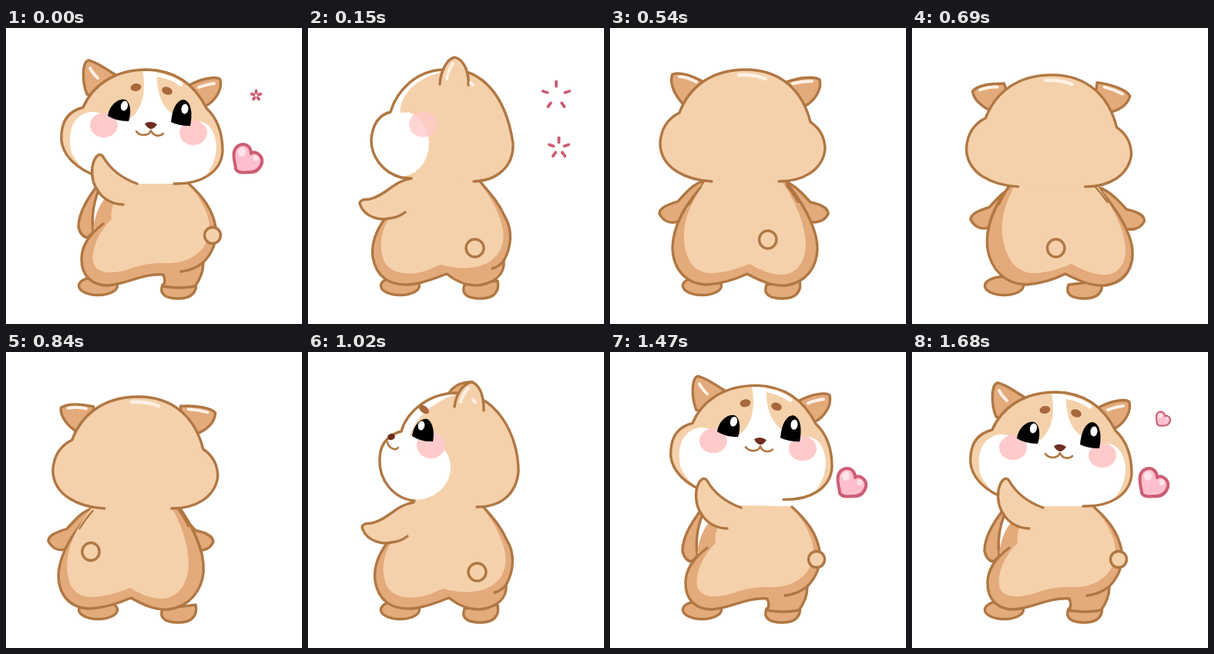
Write an HTML page with a canvas that moves like this. It is 384x384 px and loops after 1.71 s.

```html
<!DOCTYPE html>
<html lang="en">
<head>
<meta charset="utf-8">
<title>Dancing hamster</title>
<style>
html, body { margin: 0; width: 100%; height: 100%; overflow: hidden; background: #fff; }
canvas { display: block; width: 100vw; height: 100vh; }
</style>
</head>
<body>
<canvas id="stage" width="384" height="384"></canvas>
<script>
const c = document.getElementById('stage').getContext('2d');
const LOOP = 1710, STEP = 30;
const TAN = '#f5d1ab', SHADE = '#e3aa7b', LINE = '#b07743', BLUSH = '#ffcaca',
  BROW = '#a9683c', NOSE = '#6e2c20', GLOSS = '#fff0e4', ROSE = '#cc5d75';
c.lineCap = c.lineJoin = 'round';

const clamp = x => Math.max(0, Math.min(1, x));
const ramp = (t, a, b) => clamp((t - a) / (b - a));
const ease = x => x * x * (3 - 2 * x);
const mix = (a, b, k) => a + (b - a) * k;
const rad = deg => deg * Math.PI / 180;

function shape(d, fill, stroke, width = 3.4) {
  const p = typeof d === 'string' ? new Path2D(d) : d;
  if (fill) { c.fillStyle = fill; c.fill(p); }
  if (stroke) { c.strokeStyle = stroke; c.lineWidth = width; c.stroke(p); }
}
function oval(x, y, rx, ry, fill, stroke, deg = 0) {
  const p = new Path2D();
  p.ellipse(x, y, rx, ry, rad(deg), 0, 7);
  shape(p, fill, stroke);
}
function at(x, y, draw) {
  c.save();
  c.translate(x, y);
  draw();
  c.restore();
}
// Draw turned about a pivot point
function turned(x, y, deg, draw) {
  c.save();
  c.translate(x, y);
  c.rotate(rad(deg));
  c.translate(-x, -y);
  draw();
  c.restore();
}
function clipped(d, draw) {
  c.save();
  c.clip(new Path2D(d));
  draw();
  c.restore();
}

function feet() {
  oval(119.5, 334.5, 25, 12, SHADE, LINE);
  shape('M203 333C198 346 208 351 224 351C241 351 249 342 246 328Z', SHADE, LINE);
}

// Front view
function frontBody() {
  shape('M130 191C104 220 94 242 94 258Q97 271 106 272L114 264', SHADE, LINE);
  feet();
  shape('M133 188C116 212 109 238 113 264L180 264L190 196Z', '#fff');
  shape('M133 188C117 210 110 236 113 263', null, LINE);
  const torso = 'C108 268 98 282 98 300C98 322 112 334 132 334C156 333 176 318 204 320' +
    'C207 327 206 332 203 335Q225 339 245 335C252 326 256 315 256 304C268 292 274 278 272 258C268 235 255 218 236 201';
  shape('M160 200C133 206 116 232 113 262L126 254' + torso + 'Z', SHADE);
  shape('M168 199C144 204 135 232 137 248C122 262 111 284 113 303C116 320 140 320 162 312' +
    'C178 306 190 305 204 305C237 307 262 290 264 262C265 240 250 217 235 200Z', TAN);
  shape('M126 254' + torso, null, LINE);
  shape('M227 316Q244 314 256 304', null, LINE);
}
function frontHead(x, y, deg, droop) {
  const outline = 'M218 202C252 203 279 188 281 160C281 138 275 118 260 104C246 76 222 55 183 54' +
    'C140 54 112 75 100 103C84 107 73 118 72 138C70 155 80 176 112 190';
  const fill = outline + 'Q140 201 168 202Z';
  at(x, y, () => turned(180, 130, deg, () => {
    turned(124, 75, -droop, () => {
      shape('M105 86C98 68 99 44 107 42C118 44 132 55 144 62L120 90Z', SHADE, LINE);
      shape('M109 52Q112 58 119 65', null, GLOSS, 4);
    });
    turned(250, 88, droop, () => {
      shape('M238 74C255 65 274 62 278 67C281 80 271 96 257 102Z', SHADE, LINE);
      shape('M250 77Q261 73 270 72', null, GLOSS, 4);
    });
    shape(fill, TAN);
    clipped(fill, () => {
      shape('M176 50C182 75 180 105 160 118C140 125 125 106 108 109C86 114 80 135 84 158' +
        'C90 178 115 198 150 206L240 206C262 195 273 175 273 152C271 132 262 122 250 121' +
        'C235 126 208 112 201 92C196 78 195 66 196 50Z', '#fff');
      shape('M198 61Q216 64 227 73', null, '#fff', 5);
    });
    shape(outline, null, LINE);
  }));
}
function openFace() {
  oval(127, 126, 18, 16, BLUSH);
  oval(243, 136, 18, 16, BLUSH);
  oval(168.5, 77, 7, 5, BROW, null, -10);
  oval(209, 81.5, 7, 5, BROW, null, 18);
  shape('M132 114C134 99 147 90 155 93C163 98 162 112 159 121Q143 121 132 114Z', '#000');
  shape('M214 122C216 103 222 93 231 93C241 96 242 112 239 127Q224 127 214 122Z', '#000');
  oval(153.5, 101, 4.5, 6.5, '#fff', null, 15);
  oval(232, 105, 4.5, 6.5, '#fff', null, 5);
  shape('M169 134C173 140 185 141 188 133C191 141 200 141 204 137', null, LINE, 2.6);
  shape('M180 124Q188 119 196 125Q192 131 188 131Q183 130 180 124Z', NOSE);
}
function kissFace() {
  oval(144, 121, 18, 16, BLUSH);
  oval(264, 149, 17, 16, BLUSH);
  oval(190, 95, 7, 4.8, BROW, null, 3);
  oval(235, 105, 7, 4.8, BROW, null, 25);
  shape('M145 109C155 100 176 104 181 124Q164 114 145 109Z', '#000', '#000', 1.5);
  shape('M230 132C242 122 257 127 262 139Q246 134 230 132Z', '#000', '#000', 1.5);
  shape('M199 128Q207 125 215 133Q211 138 207 137Q202 135 199 128Z', NOSE);
  shape('M205 137C216 134 221 143 209 148C219 148 216 162 202 157', null, LINE, 2.6);
}
const chinArm = () =>
  shape('M170 202C148 194 134 181 126 167C122 161 115 165 112 180C109 205 125 228 152 229', TAN, LINE);
const kissArm = () =>
  shape('M171 217C180 203 200 192 225 187C240 184 254 190 255 196C252 203 240 203 230 208C222 215 218 230 208 235', TAN, LINE);

// Side views
function sideBody(x) {
  feet();
  at(x, 0, () => {
    const torso = 'M100 247C88 263 82 280 84 297C88 322 105 334 130 333C150 332 168 323 180 319' +
      'C195 331 213 337 230 332C249 326 255 314 254 302C264 284 266 262 255 244C246 224 235 213 223 199';
    shape(torso + 'L215 185L134 185Z', SHADE);
    shape('M104 248C94 266 92 285 98 300C103 316 122 320 140 318C155 316 165 309 173 307' +
      'C190 312 205 313 222 309C243 303 256 287 253 262C249 240 236 217 221 199L215 185L134 185Z', TAN);
    shape(torso, null, LINE);
    shape('M239 312Q250 309 255 300', null, LINE);
    shape('M134 195C110 199 102 217 80 222C70 222 65 225 68 230C74 246 95 250 105 247Q117 246 126 239', TAN, LINE);
    oval(216.5, 285.5, 11.5, 11.5, TAN, LINE);
  });
}
function rearHead() {
  const outline = 'M134 195L121 194C95 187 82 165 82 145C84 122 95 112 107 109C115 82 140 54 178 54' +
    'C225 50 257 88 266 150C267 180 245 198 215 199';
  shape(outline + 'Z', TAN);
  clipped(outline + 'Z', () => {
    oval(119, 150, 38, 43, '#fff');
    shape('M105 112L119 112C120 86 140 65 172 58L172 50L120 60Z', '#fff');
    shape('M120 110C117 90 142 67 171 62L185 105Z', TAN);
  });
  oval(149.5, 125, 18.5, 16.5, 'rgba(255,202,202,.8)');
  shape(outline, null, LINE);
  shape('M171 73C172 55 181 39 191 38C203 42 209 58 208 74', TAN, LINE);
  shape('M180 66Q182 54 188 46M211 71L214 74', null, GLOSS, 4);
}
function profileHead() {
  const outline = 'M138 193C110 190 92 165 93 140C93 125 98 117 104 112Q112 105 121 103C128 78 155 54 192 53' +
    'C245 53 273 108 273 155C270 185 250 201 219 201';
  shape('M183 53C190 42 203 38 213 39L205 60Z', SHADE, LINE);
  shape(outline + 'Z', TAN);
  clipped(outline + 'Z', () => {
    oval(139, 150, 46, 42, '#fff');
    shape('M90 160L100 100L130 50L204 50C168 62 143 78 132 108L140 125Z', '#fff');
  });
  oval(159.5, 121, 18.5, 17, BLUSH);
  shape(outline, null, LINE);
  shape('M190 71C192 54 202 40 213 39C224 44 228 58 228 76', TAN, LINE);
  shape('M198 65Q201 54 208 47M214 62L217 65', null, GLOSS, 4);
  oval(150.5, 74.5, 7.5, 4.5, BROW, null, 38);
  shape('M135 109C137 94 147 85 155 87C163 92 164 106 162 116Q147 117 135 109Z', '#000');
  oval(147, 95.5, 4.3, 6, '#fff', null, 10);
  oval(108, 110, 5, 4, NOSE, null, -20);
  shape('M103 117C105 126 114 128 117 124', null, LINE, 2.6);
}

// Back view, swaying between the feet
function back(t) {
  const phase = (t - 540) / 480 * 2 * Math.PI;
  const s = Math.sin(phase), dip = s * s, wag = Math.sin(phase + Math.PI / 4);
  feet();
  at(13 * s, 9 * dip, () =>
    shape('M122 198C106 203 98 215 88 225C75 229 64 233 64 241C70 252 80 255 92 250L110 235Z', SHADE, LINE));
  at(20 * s, 11 * dip, () =>
    shape('M226 198C240 204 250 215 260 226C274 229 283 233 283 241C278 252 266 254 254 250L235 225Z', SHADE, LINE));
  c.save();
  c.transform(1, 0, .13 * s, 1, -19 * s, 0);
  shape('M125 199C100 225 82 255 81 285C82 315 100 332 125 333C145 332 165 325 178 319' +
    'C195 328 210 335 228 334C255 330 269 310 269 285C268 255 245 220 228 199', SHADE, LINE);
  at(7 * s, 0, () =>
    shape('M124 198C106 225 96 245 96 272C97 300 108 317 130 318C150 318 168 311 181 306' +
      'C192 312 205 320 225 320C245 318 254 300 254 280C253 250 235 215 222 198Z', TAN));
  shape('M118 206Q110 216 103 229M229 204Q237 214 244 226', null, LINE, 2.5);
  c.restore();
  oval(165.5 + 55.5 * wag, 290 - 31 * wag * wag, 11.2, 11.5, TAN, LINE);
  at(6 * s, 8 * dip, () => {
    turned(108, 84, -32 * dip, () => {
      shape('M95 99C82 85 77 70 81 60C92 56 108 63 122 70L118 95Z', SHADE, LINE);
      shape('M90 63Q102 64 112 70', null, GLOSS, 4);
    });
    turned(245, 85, 32 * dip, () => {
      shape('M226 71C245 64 265 62 272 67C275 80 266 94 252 102L235 95Z', SHADE, LINE);
      shape('M237 72Q250 69 262 69', null, GLOSS, 4);
    });
    shape('M132 199C98 197 66 182 65 150C66 130 76 117 90 110C102 78 130 54 176 54' +
      'C222 54 250 82 260 122C272 130 279 142 279 158C275 185 250 199 219 199', TAN, LINE);
    shape('M167 61Q186 60 202 66', null, GLOSS, 4.5);
  });
}

function heart(x, y, size, deg) {
  if (size <= 0) return;
  at(x, y, () => {
    c.rotate(rad(deg));
    c.scale(size, size);
    shape('M4 -5C8 -10 20 -3 18 7C15 16 9 20 0 19C-7 20 -14 19 -16 15C-16 9 -20 1 -18 -8C-14 -21 4 -20 4 -5Z',
      '#ffbfcf', ROSE, 4);
    oval(-8, -7, 5, 6, '#ffe3ea');
    oval(10, 1, 3.5, 4, '#ffe3ea');
  });
}
function burst(x, y, age) {
  if (age < 0 || age > 200) return;
  const r = 6 + 12 * age / 150, inner = Math.max(r * .55, r - 6);
  for (let i = 0; i < 5; i++) {
    const a = rad(i * 72 - 90), u = Math.cos(a), v = Math.sin(a);
    shape(`M${x + u * inner} ${y + v * inner}L${x + u * r} ${y + v * r}`, null, ROSE, 3.8);
  }
}

function front(t) {
  const kissing = t >= 1140 && t < 1380;
  let x = 0, y = 0, lean = 0;
  if (t > 1000) {
    lean = ease(ramp(t, 1080, 1230)) * (1 - ease(ramp(t, 1350, 1440)));
    const hop = Math.sin(Math.PI * ramp(t, 1350, 1530));
    x = mix(mix(7, 4, ramp(t, 1500, 1680)), 16, lean);
    y = mix(-2, 7, lean) - 10 * hop;
  }
  frontBody();
  frontHead(x, y, 7 * lean, 17 * lean);
  if (t >= 1170 && t < 1410) at(x - 16, y - 7, kissFace);
  else at(x, y, openFace);
  (kissing ? kissArm : chinArm)();
  oval(268 + (kissing ? 2 : 0), 269 + (kissing ? 2 : 0), 10.5, 10.5, TAN, LINE);
}

function hearts(t) {
  if (t >= 1230) {
    const k = ease(ramp(t, 1260, 1470));
    heart(mix(244, 314, k), mix(151, 168, k), mix(.58, 1, k) * ramp(t, 1200, 1260), mix(45, 0, k));
    const pop = ease(ramp(t, 1470, 1590));
    heart(mix(312, 326, pop), mix(115, 86, pop), .5 * pop, 0);
  }
  if (t < 75) heart(314, 168, 1, 0);
  burst(mix(324.5, 322, ramp(t, 0, 150)), 87.5, t);
  burst(325.5, 155.5, t < 90 ? -1 : t - 60);
}

function draw(t) {
  c.clearRect(0, 0, 384, 384);
  if (t < 45 || t >= 1065) front(t);
  else if (t >= 210 && t < 975) back(t);
  else {
    const rear = t >= 120 && t < 1005;
    sideBody(rear ? 0 : 3);
    (rear ? rearHead : profileHead)();
  }
  hearts(t);
}

const start = performance.now();
function tick() {
  const t = (performance.now() - start) % LOOP;
  draw(Math.floor(t / STEP) * STEP);
  requestAnimationFrame(tick);
}
tick();
</script>
</body>
</html>
```
